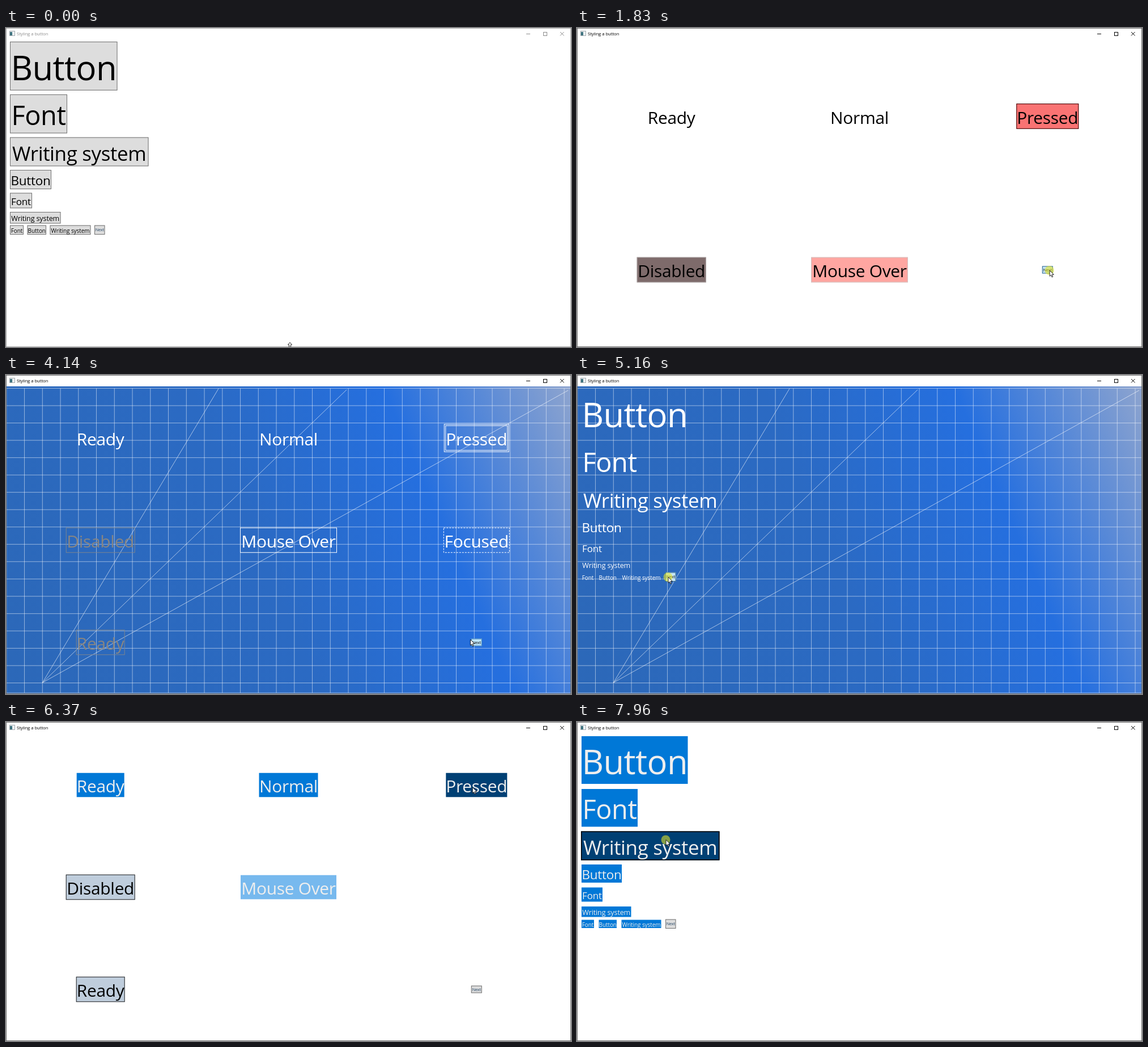
Write an HTML page with a canvas that moves like this. It is 997 px wide and 562 px high and loops after 8000 ms.

```html
<!DOCTYPE html>
<html lang="en">
<head>
<meta charset="utf-8">
<title>Styling a button</title>
<style>
html, body { margin: 0; width: 100%; height: 100%; overflow: hidden; background: #fff; }
canvas { display: block; }
</style>
</head>
<body>
<canvas id="stage" width="997" height="562"></canvas>
<script>
const W = 997, H = 562, LOOP = 8000, HOVER_LAG = 60;
const c = document.getElementById('stage').getContext('2d');

// Button looks per theme and state
const themes = {
  plain: {
    rest: { fill: '#ddd', line: '#707070' },
    hover: { fill: '#bee6fd', line: '#3c7fb1' },
    press: { fill: '#c4e5f6', line: '#2c628b' },
    nextInk: '#1c3f60'
  },
  red: {
    rest: {},
    hover: { fill: '#ffa6a1', line: '#cfc4c4' },
    press: { fill: '#fa7373', line: '#300' },
    off: { fill: '#7e6b6b', line: '#a8a0a0' },
    flat: true
  },
  blueprint: {
    rest: { ink: '#fff' },
    hover: { ink: '#fff', line: '#fff' },
    press: { ink: '#fff', line: '#fff', twice: true },
    focus: { ink: '#fff', line: '#fff', dash: [3, 2] },
    off: { ink: '#858585', line: '#7c858f' }
  },
  blue: {
    rest: { ink: '#eee', fill: '#0078d7' },
    hover: { ink: '#eee', fill: '#77b9ee' },
    press: { ink: '#eee', fill: '#004074' },
    off: { fill: '#bfcddc', line: '#222' },
    nextInk: '#1c3f60'
  }
};

const pages = [
  { from: 0, theme: 'plain', kind: 'list' },
  { from: 690, theme: 'red', kind: 'grid', rows: [155.5, 426] },
  { from: 1880, theme: 'red', kind: 'list' },
  { from: 3130, theme: 'blueprint', kind: 'grid', rows: [111, 291, 471] },
  { from: 4170, theme: 'blueprint', kind: 'list' },
  { from: 5260, theme: 'blue', kind: 'grid', rows: [111, 291, 471] },
  { from: 7400, theme: 'blue', kind: 'list' }
];

// Pointer path: time, x, y, linear
const path = [
  [70, 501, 556], [500, 171, 355], [900, 171, 355], [1200, 420, 298, 1],
  [1670, 835, 427], [1870, 834, 427], [2530, 159, 347], [3000, 158, 347],
  [3100, 186, 346, 1], [3950, 822, 468], [4100, 822, 468], [4140, 819.5, 466, 1],
  [4420, 331, 374], [4930, 161, 356], [5250, 161, 356], [5660, 178, 148],
  [5730, 179, 126, 1], [5910, 170, 115], [6110, 170, 115], [6390, 832, 115],
  [6570, 832, 115], [6770, 834, 519], [7170, 838, 472], [7340, 839, 471],
  [7580, 479, 364], [7930, 157, 207.5]
];

const clicks = [[560, 680], [1720, 1860], [2810, 2960], [3990, 4100], [5110, 5230],
  [5990, 6100], [6430, 6560], [7190, 7310], [7890, 8000]];

// Label, left, top, right, bottom, type size
const listItems = [
  ['Button', 7, 24, 196.5, 110, 61.8], ['Font', 7, 117, 108, 185.5, 48.6],
  ['Writing system', 7, 192.5, 251.5, 243.5, 36.2], ['Button', 7, 250, 80, 284, 23.3],
  ['Font', 7, 290.5, 46, 317.5, 17.7], ['Writing system', 7, 324, 96.5, 344.5, 13],
  ['Font', 7, 347.5, 31, 364, 10.4], ['Button', 37.5, 347.5, 71, 364, 10.4],
  ['Writing system', 77.5, 347.5, 149.5, 364, 10.4], ['Next', 156, 347.5, 174.5, 364, 7.4]
];

const gridItems = [
  ['Ready', 86, 'rest'], ['Normal', 106, 'rest'], ['Pressed', 110, 'press'],
  ['Disabled', 122, 'off'], ['Mouse Over', 171, 'hover'], ['Focused', 117, 'focus'],
  ['Ready', 86, 'off']
];

function pointer(t) {
  let i = path.findIndex(k => k[0] > t);
  if (i === 0) return path[0].slice(1, 3);
  if (i < 0) return path[path.length - 1].slice(1, 3);
  const a = path[i - 1], b = path[i];
  let p = (t - a[0]) / (b[0] - a[0]);
  if (!b[3]) p = p * p * (3 - 2 * p);
  return [a[1] + (b[1] - a[1]) * p, a[2] + (b[2] - a[2]) * p];
}

function text(str, x, y, size, ink, align = 'center') {
  const px = size * 0.965;
  c.font = `${px}px "Open Sans", "Noto Sans", sans-serif`;
  c.letterSpacing = `${-0.01 * px}px`;
  c.textAlign = align;
  c.fillStyle = ink || '#000';
  c.fillText(str, x, y);
}

function lines(points, ink, width = 1, close) {
  c.beginPath();
  points.forEach(([x, y]) => c.lineTo(x, y));
  if (close) c.closePath();
  c.strokeStyle = ink;
  c.lineWidth = width;
  c.stroke();
}

function frame(x, y, w, h, ink, width = 1) {
  c.strokeStyle = ink;
  c.lineWidth = width;
  c.strokeRect(x + width / 2, y + width / 2, w - width, h - width);
}

function drawButton(b, look) {
  const { x, y, w, h } = b, pad = look.line ? 0 : 1;
  if (look.fill) {
    c.fillStyle = look.fill;
    c.fillRect(x + pad, y + pad, w - 2 * pad, h - 2 * pad);
  }
  if (look.line) {
    c.setLineDash(look.dash || []);
    frame(x, y, w, h, look.line, look.width);
    c.setLineDash([]);
  }
  if (look.twice) frame(x - 2.5, y - 2.5, w + 5, h + 5, look.line);
  const base = b.label === 'Next' ? y + h / 2 + b.size * 0.36 : y + 2.3 + b.size * 1.07;
  text(b.label, x + w / 2, base, b.size, look.ink);
}

function listButtons(theme) {
  return listItems.map(([label, l, t, r, b, size], i) => {
    const dx = theme.flat ? -1.1 * Math.max(1, i - 5) : 0;
    const dy = theme.flat ? -1.2 * (Math.min(i, 6) + 1) : 0;
    return { label, x: l + dx, y: t + dy, w: r - l, h: b - t, size, state: 'rest', live: true };
  });
}

function gridButtons(page, theme, t) {
  const place = (label, w, h, size, state, col, row) => ({
    label, w, h, size, state, live: label === 'Next' || state === 'rest',
    x: 166.7 + 331.8 * col - w / 2, y: page.rows[row] - h / 2
  });
  const list = [];
  gridItems.forEach(([label, w, state], i) => {
    const row = Math.floor(i / 3);
    if (row < page.rows.length && theme[state]) list.push(place(label, w, 44.5, 31, state, i % 3, row));
  });
  list.push(place('Next', 19, 13, 7.4, 'rest', 2, page.rows.length - 1));
  if (page.theme === 'blue' && t >= 6430) {
    const b = list.find(b => b.label === 'Pressed');
    b.x += 1.5;
    b.y += 1.5;
  }
  return list;
}

function drawBlueprint() {
  const g = c.createLinearGradient(-201, 85, 836, -355);
  [[0, '#2c68b8'], [0.45, '#2b6ac3'], [0.73, '#256fdf'], [1, '#8da4cf']]
    .forEach(s => g.addColorStop(...s));
  c.fillStyle = g;
  c.fillRect(0, 20, W, H - 20);
  const ink = 'rgba(255,255,255,.5)';
  for (let i = 0; i < 32; i++) {
    const x = 0.8 + 31.75 * i;
    lines([[x, 23.5], [x, 560]], ink);
  }
  for (let i = 0; i < 18; i++) {
    const y = 23.5 + 30.53 * i;
    lines([[0, y], [W, y]], ink);
  }
  lines([[0, 560], [W, 560]], ink);
  [[375, 24], [601, 26], [992, 27]].forEach(p => lines([[64.3, 542], p], 'rgba(255,255,255,.65)', 0.9));
}

function drawChrome(active) {
  const ink = active ? '#000' : '#8c8c8c';
  c.fillStyle = '#fff';
  c.fillRect(0, 0, W, 20);
  c.fillStyle = '#eef1f3';
  c.fillRect(6, 5, 10, 9);
  c.fillStyle = '#3f7480';
  c.fillRect(7, 7, 4, 6);
  frame(6, 5, 10, 9, '#a3abb0');
  text('Styling a button', 19, 13, 8.05, ink, 'left');
  lines([[918, 10.5], [925, 10.5]], ink);
  frame(948, 7, 7, 7, ink);
  lines([[978, 7], [984.5, 13.5]], ink);
  lines([[984.5, 7], [978, 13.5]], ink);
  frame(0, 0, W, H, active ? '#707070' : '#aaa');
}

function drawPointer(x, y, up) {
  const shape = up
    ? [[0, -2], [3.5, 2], [1.5, 2], [1.5, 6], [-1.5, 6], [-1.5, 2], [-3.5, 2]]
    : [[0, 0], [0, 10.3], [2.3, 8.2], [4, 12], [5.6, 11.3], [4, 7.6], [7.2, 7.4]];
  c.save();
  c.translate(x, y);
  c.fillStyle = '#fff';
  c.beginPath();
  shape.forEach(p => c.lineTo(...p));
  c.fill();
  lines(shape, '#111', 0.9, true);
  c.restore();
}

function draw(t) {
  const page = pages.filter(p => p.from <= t).pop();
  const theme = themes[page.theme];
  const down = clicks.some(([a, b]) => t >= a && t < b);
  const [hx, hy] = pointer(t - HOVER_LAG);
  c.fillStyle = '#fff';
  c.fillRect(0, 0, W, H);
  if (page.theme === 'blueprint') drawBlueprint();

  const buttons = page.kind === 'list' ? listButtons(theme) : gridButtons(page, theme, t);
  for (const b of buttons) {
    const over = b.live && hx >= b.x && hx <= b.x + b.w && hy >= b.y && hy <= b.y + b.h;
    const state = over ? (down ? 'press' : 'hover') : b.state;
    const next = b.label === 'Next';
    let look = (next ? themes.plain : theme)[state];
    if (next) look = { ...look, ink: theme.nextInk };
    if (over && page.theme === 'blue' && page.kind === 'list' && !next) look = { ...look, line: '#000', width: 1.5 };
    drawButton(b, look);
  }
  drawChrome(t >= 560);

  const [x, y] = pointer(t);
  if (down) {
    c.fillStyle = 'rgba(230,230,40,.58)';
    c.beginPath();
    c.arc(x - 0.5, y, 8, 0, 7);
    c.fill();
  }
  drawPointer(x, y, t < 70);
}

const start = performance.now();
function tick() {
  draw((performance.now() - start) % LOOP);
  requestAnimationFrame(tick);
}
tick();
</script>
</body>
</html>
```
